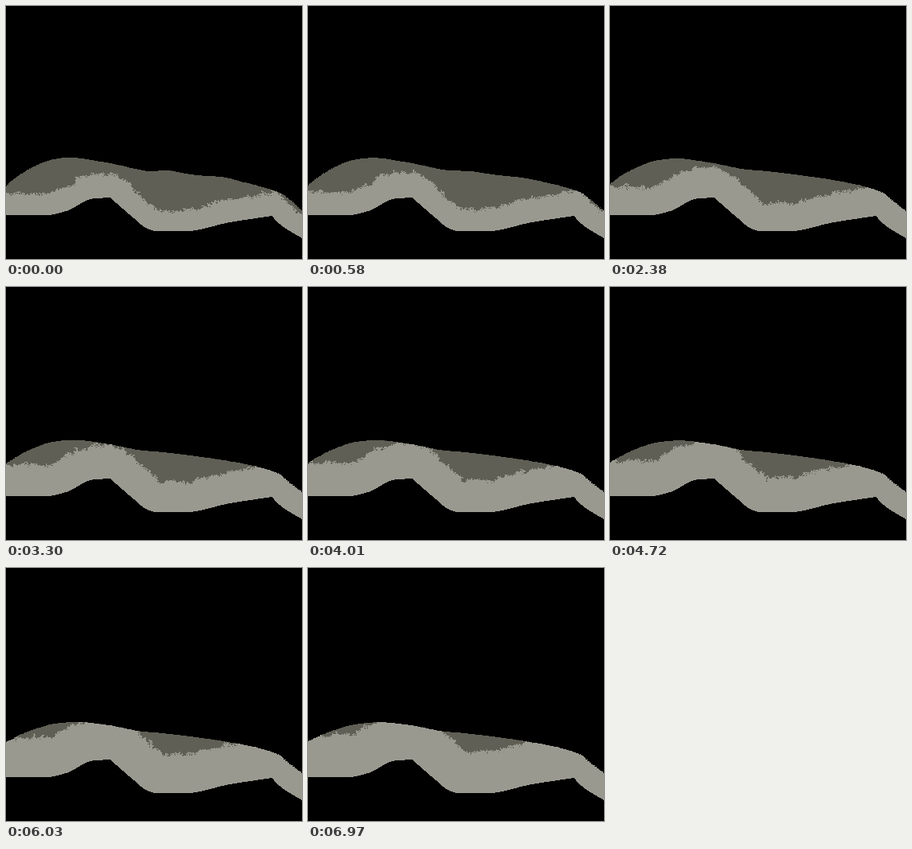
Recreate the animation shown at these times as an HTML page with a canvas. Size 370x317 px, loop 7100 ms.

```html
<!DOCTYPE html>
<html lang="en">
<head>
<meta charset="utf-8">
<title>Growing layer</title>
<style>
  html, body { margin: 0; width: 100%; height: 100%; overflow: hidden; background: #000; }
  canvas { display: block; width: 370px; height: 317px; image-rendering: pixelated; }
</style>
</head>
<body>
<canvas id="stage" width="370" height="317"></canvas>
<script>
const W = 370, H = 317, LOOP = 7100, STEPS = 60, TOP = 180, NEVER = 255;
const BLACK = 0xff000000, DARK = 0xff555f5f, LIGHT = 0xff90999a;
const START_RADIUS = 27, GROWTH = 0.4, REACH = 60;

const ctx = document.getElementById('stage').getContext('2d');
const image = ctx.createImageData(W, H);
const pixels = new Uint32Array(image.data.buffer);

const lerp = (a, b, k) => a + (b - a) * k;
const bump = (x, at, size, height) => height * Math.exp(-(((x - at) / size) ** 2) / 2);

function hash(x, y) {
  let h = Math.imul(x + 17, 374761393) ^ Math.imul(y + 91, 668265263);
  h = Math.imul(h ^ (h >>> 13), 1274126177);
  return ((h ^ (h >>> 16)) >>> 0) / 4294967296;
}

// Smooth noise around zero with features of the given size.
function noise(x, y, size) {
  x /= size; y /= size;
  const i = Math.floor(x), j = Math.floor(y), u = x - i, v = y - j;
  return lerp(lerp(hash(i, j), hash(i + 1, j), u),
              lerp(hash(i, j + 1), hash(i + 1, j + 1), u), v) - 0.5;
}

// Monotone cubic through the points, sampled at pixel centres; parts meet in corners.
function curve(...parts) {
  const out = new Float32Array(W);
  for (const pts of parts) {
    const slope = i => (pts[i + 1][1] - pts[i][1]) / (pts[i + 1][0] - pts[i][0]);
    const tangent = i => {
      if (i === 0) return slope(0);
      if (i === pts.length - 1) return slope(i - 1);
      const a = slope(i - 1), b = slope(i);
      return a * b <= 0 ? 0 : 2 * a * b / (a + b);
    };
    for (let i = 0; i < pts.length - 1; i++) {
      const [x0, y0] = pts[i], [x1, y1] = pts[i + 1], w = x1 - x0;
      for (let x = x0; x < x1; x++) {
        const t = (x + 0.5 - x0) / w, s = 1 - t;
        out[x] = (1 + 2 * t) * s * s * y0 + t * s * s * w * tangent(i)
               + t * t * (3 - 2 * t) * y1 - t * t * s * w * tangent(i + 1);
      }
    }
  }
  return out;
}

const ground = curve(
  [[0, 262], [50, 262], [75, 257], [108, 241.5], [130, 240]],
  [[130, 240], [160, 266], [175, 278], [190, 282.5], [222, 282.5], [280, 271], [332, 263]],
  [[332, 263], [345, 275.5], [370, 291]]);

const settled = curve(
  [[0, 217], [30, 204], [60, 195.8], [90, 193.2], [125, 196.5], [167, 204.3],
   [203, 207.8], [300, 222], [340, 233.5], [350, 241.5], [370, 257]]);

// The left slope settles steadily, the small bumps on the right fade fast.
function crest(x, step) {
  const slow = 1 - step / (STEPS - 1), fast = Math.exp(-step / 7);
  return settled[x]
    + slow * (8.5 * Math.exp(-x / 18) + bump(x, 64, 28, -4.3))
    + fast * (bump(x, 175, 10, 1.4) + bump(x, 205, 10, -1.8)
            + bump(x, 272, 16, -2.5) + bump(x, 353, 8, -3));
}

function distanceToGround(x, y) {
  let best = Infinity;
  const end = Math.min(W - 1, x + REACH);
  for (let i = Math.max(0, x - REACH); i <= end; i++) {
    const dx = i - x, dy = ground[i] - y - 0.5;
    best = Math.min(best, dx * dx + dy * dy);
  }
  return Math.sqrt(best);
}

// The layer thickens along the normal of the ground, a little faster higher up.
const ready = new Float32Array(W * H);
const joined = new Uint8Array(W * H).fill(NEVER);
for (let y = TOP; y < H; y++) {
  for (let x = 0; x < W; x++) {
    const rough = 5 * noise(x, y, 7) + 4 * noise(x + 400, y, 3) + 5 * (hash(x + 900, y) - 0.5);
    const radius = START_RADIUS + 0.06 * (250 - y) + rough;
    const p = y * W + x;
    ready[p] = y >= ground[x] ? 0 : (distanceToGround(x, y) - radius) / GROWTH;
  }
}

// A pixel joins once it is ready and touches the layer.
function grow(step) {
  const visit = (x, y) => {
    const p = y * W + x;
    if (joined[p] !== NEVER || ready[p] > step) return;
    if (y >= ground[x] - 1 || joined[p + W] !== NEVER || joined[p - W] !== NEVER
      || (x > 0 && joined[p - 1] !== NEVER)
      || (x < W - 1 && joined[p + 1] !== NEVER)) joined[p] = step;
  };
  for (let y = H - 2; y >= TOP; y--) {
    for (let x = 0; x < W; x++) visit(x, y);
    for (let x = W - 1; x >= 0; x--) visit(x, y);
  }
}
for (let step = 0; step < STEPS; step++) grow(step);

function draw(step) {
  pixels.fill(BLACK);
  for (let x = 0; x < W; x++) {
    const top = crest(x, step);
    const slope = Math.abs(crest(Math.min(x + 1, W - 1), step) - top);
    for (let y = TOP; y + 0.5 < ground[x]; y++) {
      const p = y * W + x;
      if (y + 0.5 < top + (hash(x, y + 500) - 0.5) * 2 * slope) continue;
      pixels[p] = joined[p] <= step ? LIGHT : DARK;
    }
  }
  ctx.putImageData(image, 0, 0);
}

let shown = -1;
const begin = performance.now();
function tick() {
  const t = (performance.now() - begin) % LOOP;
  const step = Math.min(STEPS - 1, Math.floor((t + 22) * STEPS / LOOP));
  if (step !== shown) draw(shown = step);
  requestAnimationFrame(tick);
}
tick();
</script>
</body>
</html>
```
